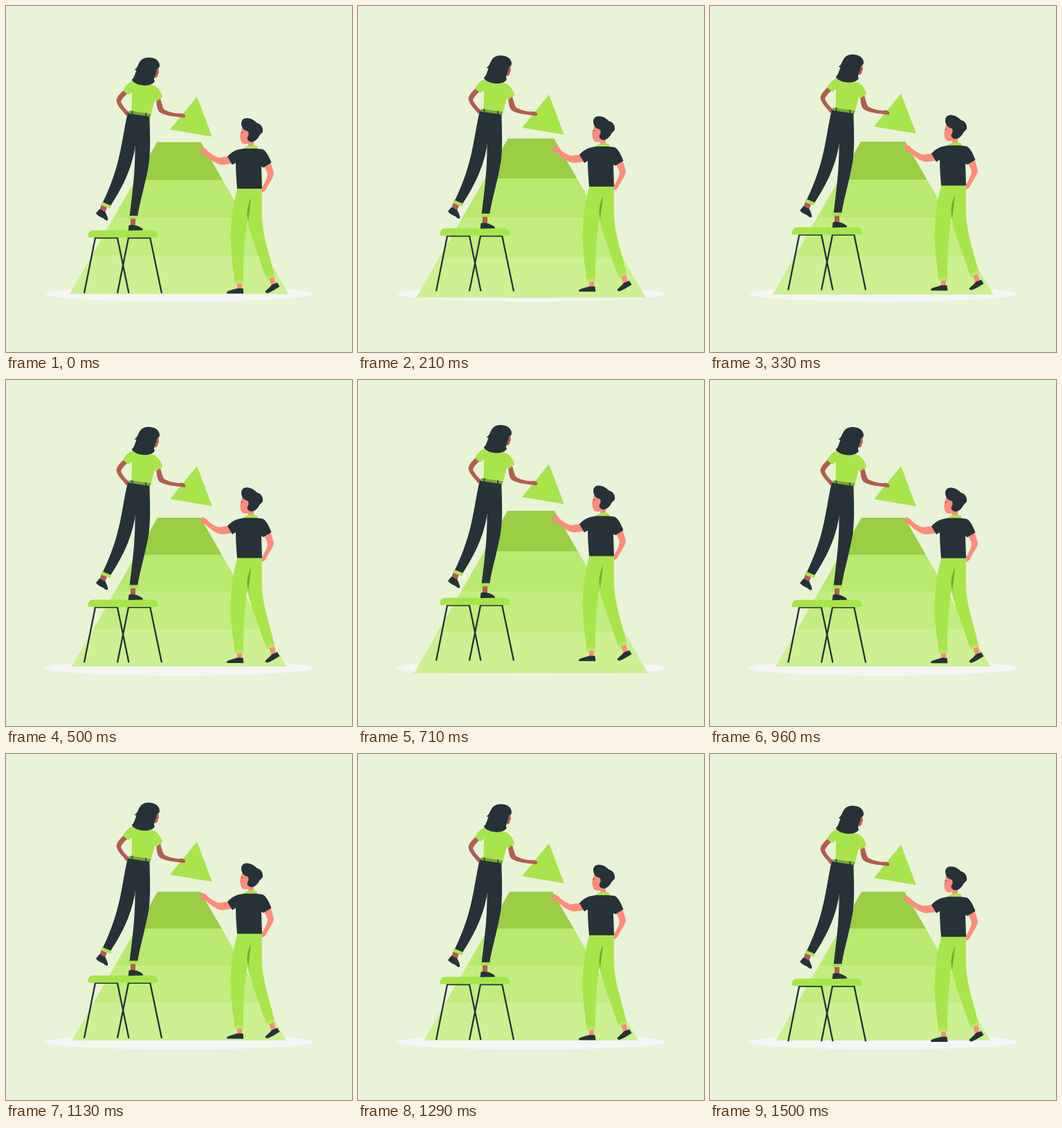
An HTML page for the animation above (1540 ms loop, 500x500 px).

```html
<!DOCTYPE html>
<html lang="en">
<head>
<meta charset="utf-8">
<title>Building the pyramid</title>
<style>
  html, body { margin: 0; width: 100%; height: 100%; overflow: hidden; background: #e8f3d8; }
  svg { display: block; width: 100%; height: 100%; }
  .green { fill: #a8e54a; }
  .dark { fill: #263238; }
  .brown { fill: #b55b52; }
  .pink { fill: #ff8b7b; }
  .olive { fill: #78a536; }
  .cuff { fill: #b5e964; }
  .line { fill: none; stroke: #263238; stroke-width: 2.3; }
</style>
</head>
<body>
<svg viewBox="0 0 500 500">
  <rect width="500" height="500" fill="#e8f3d8"/>
  <ellipse cx="250" cy="416" rx="194" ry="11.3" fill="#f5f5f5"/>

  <g id="pyramid"></g>

  <g id="people">
    <!-- stool -->
    <path class="line" d="M113 415.3L129 335.5H161L177.5 415.3M161 415.3L177 335.5H208.3L225 415.3"/>
    <path class="green" d="M126.500 324.500H211.500C216.500 324.500 219.500 328 219.500 332.500C219.500 334.300 218.700 335 217 335H120.500C119 335 118.300 334.300 118.300 332.500C118.500 328 121.500 324.500 126.500 324.500Z"/>

    <!-- capstone -->
    <path class="green" d="M276 131.300L297.800 189.200L237 179Z"/>

    <!-- woman -->
    <path class="brown" d="M170 122C165 127 160 132 159.500 137.500C161 146 169 152 174 159.500L177.500 154C173 150 167 143 166 138.500C168 134 172 130 175.500 127Z"/>
    <path class="brown" d="M217 137C218 146 219 151 222 154C229 158.500 240 160 250 161L258 162L259.500 159.500C258.500 156 254 155 251 156C243 156 232 152.500 228 149.500C226 146 225 141 223 134Z"/>
    <path class="brown" d="M137.500 288L146 291.500L143 299L135 296Z"/>
    <path class="brown" d="M180 306H187V319H180Z"/>
    <path class="dark" d="M134.500 294.500C137.500 293 138.500 297 143 297.500C145.500 302 147.300 306 147.300 309.500C145.500 311.500 143 309.500 141 307.500C137 305.500 132 303.500 130 300Z"/>
    <path class="dark" d="M176.800 325L177.500 317.500C180.500 315.300 185.500 317.500 189 317.700C193 320 198 321 198 324.500Z"/>
    <path class="dark" d="M176 154.500C170 180 167.500 205 160.500 230C155 250 147 270 139.500 285L150.500 290C165 268 180 241 186 208L187.500 180Z"/>
    <path class="dark" d="M176 154.500L207.500 159C207.500 178 209.500 205 206.500 228C202 256 194 280 190 305H178.500C182 276 187 240 186.500 205L182 180Z"/>
    <path class="green" d="M139 283.500L152 289L150.500 293L137.300 287.500Z"/>
    <path class="green" d="M177.300 303.300H190.700L190 308H176.700Z"/>
    <path class="green" d="M184 108.500C176 111.500 172 117 169 122.500L176.500 129L182 125L181.500 153L209.500 158C211 150 213 144 215 137L218 138L226.200 132C224 124 219 117.500 214 115.500Z"/>
    <path class="olive" d="M178 151.700L209.300 156.300L208.700 160.300L176.800 155.600Z"/>
    <path class="dark" d="M181.800 151.700H183.200V157H181.800ZM201.500 154.700H203V160H201.500Z"/>
    <path class="brown" d="M214 88L220.300 90L220.500 93.500L221 97L219.500 98.500C219.700 103 217.500 104.500 213 104.500Z"/>
    <path class="dark" d="M185.500 92.500C190 90.500 190.500 85 194 80C197.500 75.500 203 74.200 209 75C217 75.500 222.300 81 222 87C221.500 91 219 90 217.700 92C217.500 100 211.500 105 215 109C213 113 208 115.300 200 115.300C191 115 184 111.500 181.700 107C185.500 104.500 186.500 98 188.500 93.500Z"/>

    <!-- man -->
    <path class="pink" d="M322 218C316 218 311 220 307 219.500C301 217.500 296 214 292 211L289 207.500C287 206 285 206.500 284 204.500L282.500 206C280 208 280 211 282 213C284 215 287 215 289 216.500C296 223 305 230 313 230C318 229.500 322 229 326 228Z"/>
    <path class="pink" d="M373 232C376 238 378 242 378 244.500C377 250 374 257 371 261L369.500 264V269.500C372 270 374 268 376 265C378 260 386 249 387 243.500C386 237 384 231 382 227Z"/>
    <path class="pink" d="M334 400H341V411H334Z"/>
    <path class="pink" d="M380 394.500L387 391.500L390 402L384 405Z"/>
    <path class="dark" d="M319 415.500C318.500 412 326 411 331 409.500C335 407.500 341 409 342.500 408.500L343.500 416H320Z"/>
    <path class="dark" d="M374.300 413.500C377 410 381 407.500 383 404.500C386 401.500 390 402 392 400L395.500 406C390 409 384 413.500 377 415.700Z"/>
    <path class="green" d="M334.500 263.500C327 290 324.500 318 324.500 338C325.500 365 329 385 330 399H343C343 375 343.500 345 348.500 311C356 340 368 370 376 394L388 389.500C381 358 370.500 335 369.800 300V263.500Z"/>
    <path class="olive" d="M354 277.500C350 287 348 296 348.700 304L350 311.500C351.500 299 353 290 354 277.500Z"/>
    <path class="cuff" d="M329.800 396.500H343.500L343 401.700H330.300ZM375 392.200L387.300 387.500L389.300 391.500L376.800 396.300Z"/>
    <path class="pink" d="M341.500 174C340 182 337.500 188 338.500 190C339 196 341 200 346 200L350 199.500L350.500 205L358 204V180Z"/>
    <path class="green" d="M342.500 208C345 202 356 200 362.500 203L364 208Z"/>
    <path class="dark" d="M344 206.300L335 208C329 210 324 213.500 320 218L327 230L332 227C332 240 333 252 334 264.300H370L369 232.500L372 234L383.500 227C380 218 376 210 371 207.500L362 206.300Z"/>
    <path class="dark" d="M340 171C339.500 164.500 345 161 352 163C358 164 361 169 364 170C369 171.500 372 177 371 182.500C368 186 366 187 365 190C361.500 195 357 198 352.500 196.500C348.500 194.500 347.500 191.500 350 188.500C351.500 184 350 181 347.500 181C343.500 180 340.500 176 340 171Z"/>
    <path class="dark" d="M339.700 183.300L342.300 182.200V183.100L339.700 184.200Z"/>
  </g>
</svg>
<script>
  const LOOP = 1540, CYCLE = 1500, STEP = 1000 / 24, LEAD = 30;
  const MID = 306.5, RISE = 10;
  const pyramid = document.getElementById("pyramid");
  const people = document.getElementById("people");

  // Four bands, each one fifth of a full triangle's height
  const band = 53.75, flare = 31, top0 = 199;
  pyramid.innerHTML = ["#9ace44", "#b9e96e", "#c3ed80", "#cdf092"].map((color, i) => {
    const y = top0 + i * band, a = flare * (i + 1), b = a + flare;
    return `<path fill="${color}" d="M${250 - a} ${y}H${250 + a}L${250 + b} ${y + band}H${250 - b}Z"/>`;
  }).join("");

  const ramp = (p, a, b) => Math.min(1, Math.max(0, (p - a) / (b - a)));

  // Two beats, then rest
  function beat(p) {
    const first = ramp(p, 0, 0.1) - ramp(p, 0.1, 0.3);
    const second = ramp(p, 0.4, 0.5) - ramp(p, 0.5, 0.6);
    return 1 + 0.1 * (first + second);
  }

  function draw(ms) {
    // The motion advances at 24 steps per second
    const t = Math.floor((ms % LOOP + 5) / STEP) * STEP;
    const p = Math.min(1, (t + LEAD) / CYCLE);
    const lift = RISE * (1 - Math.abs(2 * p - 1));
    people.setAttribute("transform", `translate(0 ${-lift})`);
    pyramid.setAttribute("transform", `translate(250 ${MID}) scale(${beat(p)}) translate(-250 ${-MID})`);
  }

  let start;
  function tick(now) {
    start ??= now;
    draw(now - start);
    requestAnimationFrame(tick);
  }
  draw(0);
  requestAnimationFrame(tick);
</script>
</body>
</html>
```
